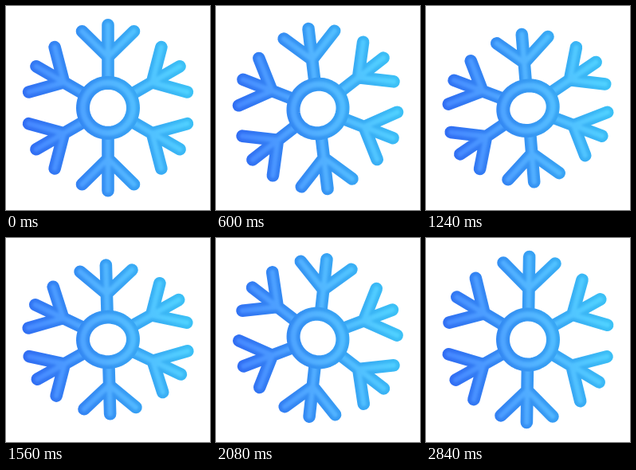
These frames come from a looping animation (256x256 px, 2880 ms). An HTML page:

```html
<!DOCTYPE html>
<html lang="en">
<head>
<meta charset="utf-8">
<title>Snowflake</title>
<style>
  html, body { margin: 0; width: 100%; height: 100%; overflow: hidden; background: #fff; }
  svg { display: block; width: 100%; height: 100%; }
  use { fill: none; stroke-linecap: round; stroke-linejoin: round; }
  .body { stroke: url(#body); }
  .core { stroke: url(#core); filter: url(#soft); }
</style>
</head>
<body>
<svg viewBox="0 0 256 256">
  <defs>
    <linearGradient id="body" gradientUnits="userSpaceOnUse" x1="22" y1="146" x2="234" y2="106">
      <stop offset="0" stop-color="#316df3"/>
      <stop offset=".5" stop-color="#3698f3"/>
      <stop offset="1" stop-color="#3cc2f6"/>
    </linearGradient>
    <linearGradient id="core" gradientUnits="userSpaceOnUse" x1="22" y1="146" x2="234" y2="106">
      <stop offset="0" stop-color="#4585ff"/>
      <stop offset=".5" stop-color="#52b2ff"/>
      <stop offset="1" stop-color="#50d4ff"/>
    </linearGradient>
    <filter id="soft" filterUnits="userSpaceOnUse" x="0" y="0" width="256" height="256" color-interpolation-filters="sRGB">
      <feGaussianBlur stdDeviation="1.7"/>
    </filter>
    <path id="arms"/>
    <path id="ring"/>
  </defs>
  <use class="body" href="#arms" stroke-width="15.6"/>
  <use class="core" href="#arms" stroke-width="6.5"/>
  <use class="body" href="#ring" stroke-width="17"/>
  <use class="core" href="#ring" stroke-width="7.5"/>
</svg>
<script>
const LOOP = 2880, STEP = 40, RAD = Math.PI / 180;

// Key poses: angles in degrees, lift in pixels
const times = [0, 600, 1240, 1560, 2080, 2560, 2840];
const spin  = [0, -7.8, -6.1, -1.8, 7.7, 8.8, 0.9];
const yaw   = [0, 10, 8, 1.5, -11, -14, -1.5];
const pitch = [0, 12, 26, 26, 16, 4, 0.2];
const lift  = [-0.2, 1, 0.2, -0.6, -2.5, -1.6, -0.5];

// Smooth periodic curve through the key values
function curve(values, t) {
  const n = times.length;
  const at = i => {
    const k = (i + n) % n;
    return [times[k] + LOOP * Math.floor(i / n), values[k]];
  };
  const slope = i => {
    const [ta, a] = at(i - 1), [tb, b] = at(i), [tc, c] = at(i + 1);
    const before = tb - ta, after = tc - tb;
    return ((b - a) / before * after + (c - b) / after * before) / (before + after);
  };
  let i = n - 1;
  while (times[i] > t) i--;
  const [t0, v0] = at(i), [t1, v1] = at(i + 1);
  const h = t1 - t0, s = (t - t0) / h, r = 1 - s;
  return v0 * (1 + 2 * s) * r * r + v1 * s * s * (3 - 2 * s)
    + h * s * r * (slope(i) * r - slope(i + 1) * s);
}

// Turn in the plane, then foreshorten along the tilt direction
function projector(t) {
  const a = curve(spin, t) * RAD, u = curve(yaw, t), v = curve(pitch, t);
  const tilt = Math.hypot(u, v) || 1, nx = u / tilt, ny = v / tilt;
  const shrink = 1 - Math.cos(tilt * RAD), dy = curve(lift, t);
  const c = Math.cos(a), s = Math.sin(a);
  return (x, y) => {
    const px = c * x - s * y, py = s * x + c * y;
    const d = shrink * (px * nx + py * ny);
    return `${(128 + px - d * nx).toFixed(2)} ${(128 + dy + py - d * ny).toFixed(2)}`;
  };
}

const armsPath = document.getElementById("arms");
const ringPath = document.getElementById("ring");

function draw(t) {
  const project = projector(t);
  let arms = "";
  for (let k = 0; k < 6; k++) {
    const c = Math.cos(k * 60 * RAD), s = Math.sin(k * 60 * RAD);
    const p = (x, y) => project(c * x - s * y, s * x + c * y);
    arms += `M${p(0, -36)}L${p(0, -104)}M${p(-32.5, -96)}L${p(0, -64)}L${p(32.5, -96)}`;
  }
  armsPath.setAttribute("d", arms);

  const rim = Array.from({ length: 72 }, (_, i) =>
    project(31.5 * Math.cos(i * 5 * RAD), 31.5 * Math.sin(i * 5 * RAD)));
  ringPath.setAttribute("d", `M${rim.join("L")}Z`);
}

const start = performance.now();
function tick() {
  const t = (performance.now() - start) % LOOP;
  draw(Math.floor(t / STEP) * STEP);
  requestAnimationFrame(tick);
}
tick();
</script>
</body>
</html>
```
